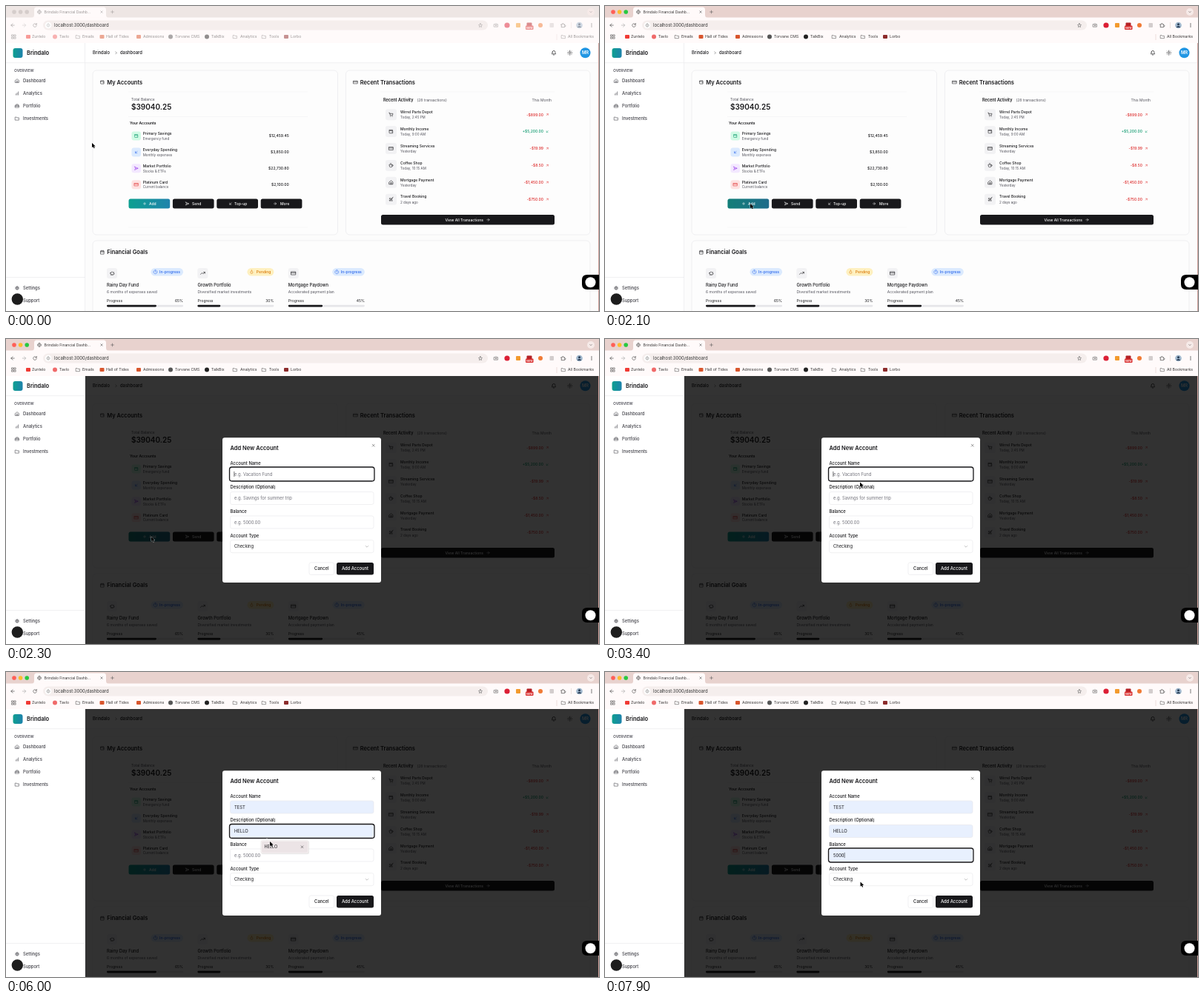
Recreate the animation shown at these times as an HTML page. Size 800 px wide and 412 px high, loop 8 s.

```html
<!DOCTYPE html>
<html lang="en">
<head>
<meta charset="utf-8">
<title>Finance dashboard</title>
<style>
  html, body { margin: 0; width: 100%; height: 100%; overflow: hidden; background: #fff; }
  svg { display: block; width: 800px; height: 412px; }
  text { font-family: Inter, "Liberation Sans", sans-serif; white-space: pre; }
  .idle .dim { opacity: .5; }
  .idle .strip { fill: #eee6e4; }
  .idle .light { fill: #d5cdcb; }
</style>
</head>
<body>
<svg id="stage" viewBox="0 0 800 412"></svg>
<script>
const INK = '#18181b', MUTED = '#52525b', LINE = '#e6e6e9', SOFT = '#f2f2f4';
const XS = 5, SM = 5.83, LG = 7.5, TINY = 4.58;

const ICONS = {
  home: 'M3 10l9-7 9 7v11H3zM9 21v-8h6v8',
  bars: 'M6 20v-5M12 20V10M18 20V4',
  case: 'M3 9h18v11H3zM7 9V4h10v5M3 14h18',
  folder: 'M3 5h6l2 3h10v12H3z',
  gear: 'M12 5a7 7 0 1 0 .01 0M12 9.5a2.5 2.5 0 1 0 .01 0M12 2v3M12 19v3M2 12h3M19 12h3M5 5l2 2M17 17l2 2M5 19l2-2M17 7l2-2',
  sun: 'M12 8a4 4 0 1 0 .01 0M12 2v2M12 20v2M2 12h2M20 12h2M5 5l1 1M18 18l1 1M5 19l1-1M18 6l1-1',
  bell: 'M6 9a6 6 0 0 1 12 0c0 6 3 8 3 8H3s3-2 3-8M10 21h4',
  wallet: 'M19 7V4H5a2 2 0 0 0 0 4h15v12H5a2 2 0 0 1-2-2V6M16 14h2',
  card: 'M2 5h20v14H2zM2 10h20',
  cart: 'M2 3h3l3 13h11l2-9H6M9 20v1M18 20v1',
  cup: 'M4 8h13v8a4 4 0 0 1-4 4H8a4 4 0 0 1-4-4zM17 9h2a3 3 0 0 1 0 6h-2M8 2v2M13 2v2',
  plane: 'M21 3l-6 6-10-3-2 2 8 5-4 4-3-1-1 1 4 4 1-1-1-3 4-4 5 8 2-2-3-10z',
  up: 'M7 17L17 7M8 7h9v9',
  down: 'M17 7L7 17M16 17H7V8',
  right: 'M5 12h14M12 5l7 7-7 7',
  left: 'M19 12H5M12 5l-7 7 7 7',
  plus: 'M12 5v14M5 12h14',
  cross: 'M6 6l12 12M18 6L6 18',
  send: 'M3 3l18 9-18 9 4-9zM7 12h14',
  trend: 'M2 17l7-7 5 5 8-8M16 7h6v6',
  pig: 'M5 11a7 6 0 0 1 12-3l3-1v4l2 1v4h-3l-2 4h-3v-2h-4v2H7l-1-4a6 6 0 0 1-1-5z',
  cal: 'M4 5h16v16H4zM4 10h16M8 2v5M16 2v5',
  clock: 'M12 2a10 10 0 1 0 .01 0M12 7v5l3 2',
  flame: 'M12 3c1 5 6 6 6 12a6 6 0 0 1-12 0c0-3 2-4 2-6 2 1 3 2 4-6',
  chevR: 'M9 5l7 7-7 7',
  chevD: 'M5 9l7 7 7-7',
  reload: 'M19 8a8 8 0 1 0 1 6M20 3v6h-6',
  star: 'M12 3l3 6 6 1-4.500 4.500 1 6.500-5.500-3-5.500 3 1-6.500L3 10l6-1z',
  camera: 'M3 7h5l2-3h4l2 3h5v13H3zM12 10a3 3 0 1 0 .01 0',
  puzzle: 'M4 8h5a3 3 0 1 1 5 0h5v5a3 3 0 1 1 0 4v4H4v-5a2 2 0 1 0 0-4z',
  grid: 'M3 3h7v7H3zM14 3h7v7h-7zM3 14h7v7H3zM14 14h7v7h-7z',
  globe: 'M12 2a10 10 0 1 0 .01 0M2 12h20M12 2c-6 6-6 14 0 20M12 2c6 6 6 14 0 20',
  info: 'M12 2a10 10 0 1 0 .01 0M12 11v6M12 7v1'
};

// Text is placed by the vertical middle of its capitals.
const text = (x, mid, str, size = XS, weight = 400, fill = INK, anchor = 'start') =>
  `<text x="${x}" y="${mid + size * .36}" font-size="${size}" font-weight="${weight}" fill="${fill}" text-anchor="${anchor}">${str}</text>`;
const rect = (x, y, w, h, fill, r = 0, extra = '') =>
  `<rect x="${x}" y="${y}" width="${w}" height="${h}" rx="${r}" fill="${fill}" ${extra}/>`;
const dot = (x, y, r, fill, extra = '') => `<circle cx="${x}" cy="${y}" r="${r}" fill="${fill}" ${extra}/>`;
const line = (x1, y1, x2, y2, color = LINE) =>
  `<path d="M${x1} ${y1}L${x2} ${y2}" stroke="${color}" stroke-width=".6"/>`;
const icon = (x, y, name, size = 6.4, color = INK) =>
  `<path d="${ICONS[name]}" transform="translate(${x - size / 2} ${y - size / 2}) scale(${size / 24})" fill="none" stroke="${color}" stroke-width="2.1" stroke-linecap="round" stroke-linejoin="round"/>`;
const border = (color = LINE) => `stroke="${color}" stroke-width=".6"`;
const group = (id, body, extra = '') => `<g id="${id}" ${extra}>${body}</g>`;

function browser() {
  const marks = [
    [30, 35, 'Zuntelo', '#f03a34', 's'], [66, 72, 'Tavlo', '#f06a6a', 'o'], [97, 103, 'Emails'],
    [129.5, 135, 'Hall of Tides', '#d8552c', 's'], [179, 185, 'Admissions', '#d8552c', 's'],
    [222, 228, 'Torvane CMS', '#555', 'o'], [271, 277, 'TalkBix', '#222', 'o'],
    [309, 316, 'Analytics'], [348, 355, 'Tools'], [378, 384, 'Lorbo', '#8c2b2b', 's']
  ];
  let s = rect(0, 0, 800, 16, '#e8d2ce', 0, 'class="strip"');
  ['#ff5f57', '#febc2e', '#28c840'].forEach((c, i) => s += dot(11 + i * 8.6, 8, 2.8, c, 'class="light"'));
  s += `<path d="M34 16q4 0 4-4V5q0-3.500 3.500-3.500h90q3.500 0 3.500 3.500v7q0 4 4 4z" fill="#fffafa"/>`
    + rect(0, 15.5, 800, 34.5, '#fffafa')
    + rect(50, 19.5, 600, 13, '#f5eeed', 6.5)
    + dot(57, 26, 4.3, '#fff') + dot(789, 8, 5, '#f6eae8');
  let d = icon(45, 8, 'globe', 6, '#555') + text(51.5, 8, 'Brindalo Financial Dashb…', XS, 400, '#333')
    + icon(129, 8, 'cross', 5) + icon(143.500, 8, 'plus', 6.5, '#555') + icon(789, 8, 'chevD', 4.5)
    + icon(9, 26, 'left', 7.5, '#444') + icon(24.5, 26, 'right', 7.5, '#aaa') + icon(39, 26, 'reload', 7, '#444')
    + icon(57, 26, 'info', 5, '#555') + icon(640, 26, 'star', 6.5, '#555')
    + icon(661, 26, 'camera', 6.5, '#555') + dot(676, 26, 3.6, '#dc1f35')
    + rect(688, 23, 6, 6, '#f39a2d', 1) + rect(702.5, 22.500, 7, 6, '#b32025', 1)
    + rect(701, 26.5, 10.5, 5.5, '#d92b2b', 1) + text(706.2, 29.3, 'New', 3.8, 600, '#fff', 'middle')
    + dot(721, 26, 3, '#f07a35') + rect(733.5, 23, 5.500, 6, '#d3cdcd', 1)
    + icon(751.5, 26, 'puzzle', 7, '#333') + line(762.5, 22, 762.5, 30, '#dfcfcc')
    + dot(773.5, 26, 4.3, '#9fb6cc') + dot(773.5, 24.8, 1.5, '#263a52') + `<path d="M770.500 29q3-4 6 0z" fill="#263a52"/>`
    + [-2, 0, 2].map(k => dot(790, 26 + k, .65, '#444')).join('');
  d += icon(10.5, 41.5, 'grid', 7, '#555');
  marks.forEach(([ix, tx, name, color, shape]) => {
    d += !color ? icon(ix, 41.5, 'folder', 6.5, '#555')
      : shape === 'o' ? dot(ix, 41.5, 3, color) : rect(ix - 3, 39, 6, 5, color, 1);
    d += text(tx, 41.5, name, 5.2, 400, '#333');
  });
  d += line(743, 38, 743, 46, '#dfcfcc') + icon(752, 41.5, 'folder', 6.5, '#555')
    + text(758, 41.5, 'All Bookmarks', 5.2, 400, '#333');
  return s + `<g class="dim">${d}</g>` + text(65, 26, 'localhost:3000/dashboard', 5.9, 400, '#333');
}

function sidebar() {
  const items = [[101, 'home', 'Dashboard'], [118, 'bars', 'Analytics'], [135, 'case', 'Portfolio'],
    [152, 'folder', 'Investments'], [381, 'gear', 'Settings'], [398, 'clock', 'Support']];
  return rect(0, 50, 106.5, 362, '#fff') + line(106.5, 50, 106.5, 412) + line(0, 76.700, 106.5, 76.7) + line(0, 366.5, 106.5, 366.5)
    + rect(9.5, 57, 13, 13, 'url(#teal)', 3) + text(28, 63.5, 'Brindalo', LG, 600)
    + text(11, 87, 'OVERVIEW', XS, 600, MUTED)
    + items.map(([y, i, name]) => icon(15, y, i, 6.4, '#3f3f46') + text(23, y, name, SM, 500, '#3f3f46')).join('');
}

function accounts() {
  const rows = [
    ['Primary Savings', 'Emergency fund', '$12,459.45', 'wallet', '#d1fae5', '#059669'],
    ['Everyday Spending', 'Monthly expenses', '$3,850.00', 'down', '#dbeafe', '#2563eb'],
    ['Market Portfolio', 'Stocks &amp; ETFs', '$22,730.80', 'send', '#f3e8ff', '#9333ea'],
    ['Platinum Card', 'Current balance', '$2,100.00', 'card', '#fee2e2', '#dc2626']
  ];
  const buttons = [['Add', 'plus', 187, 193], ['Send', 'send', 244.5, 251], ['Top-up', 'down', 303, 308], ['More', 'right', 363, 370]];
  let s = panel(117, 87, 330.5, 222, 'wallet', 'My Accounts', 103)
    + line(165, 116, 407, 116, SOFT) + line(165, 149.5, 407, 149.5, SOFT) + line(165, 299, 407, 299, SOFT)
    + text(169, 126.5, 'Total Balance', XS, 400, MUTED) + text(169, 136.5, '$39040.25', 10, 600)
    + text(167, 158.5, 'Your Accounts', XS, 600);
  rows.forEach(([name, sub, sum, ic, bg, fg], i) => {
    const y = 175.5 + i * 21.9;
    s += rect(169.5, y - 6, 12.5, 12, bg, 3) + icon(175.8, y, ic, 6, fg)
      + text(184.7, y - 3.4, name, XS, 500) + text(184.7, y + 3.6, sub, TINY, 400, MUTED)
      + text(381.7, y, sum, XS, 500, INK, 'end');
  });
  buttons.forEach(([name, ic, ix, tx], i) => {
    s += rect(165.5 + i * 59.4, 260.5, 55.7, 13, i ? INK : 'url(#teal)', 2.5);
    if (!i) s += rect(165.5, 260.5, 55.7, 13, '#1f3f4c', 2.5, 'id="hover" opacity=".35"');
    s += icon(ix, 267, ic, 5.5, '#fff') + text(tx, 267, name, XS, 500, '#fff');
  });
  return s;
}

function activity() {
  const rows = [
    ['Wirrel Parts Depot', 'Today, 2:45 PM', '-$899.00', 'cart'],
    ['Monthly Income', 'Today, 9:00 AM', '+$5,200.00', 'wallet'],
    ['Streaming Services', 'Yesterday', '-$19.99', 'card'],
    ['Coffee Shop', 'Today, 10:15 AM', '-$8.50', 'cup'],
    ['Mortgage Payment', 'Yesterday', '-$1,450.00', 'home'],
    ['Travel Booking', '2 days ago', '-$750.00', 'plane']
  ];
  let s = panel(458.5, 87, 329.5, 222, 'card', 'Recent Transactions', 103)
    + line(505, 116, 740, 116, SOFT) + line(505, 299, 740, 299, SOFT)
    + text(509, 127.3, 'Recent Activity', 5.5, 600) + text(554.5, 127.3, '(28 transactions)', XS, 400, MUTED)
    + text(736, 127.3, 'This Month', XS, 400, MUTED, 'end');
  rows.forEach(([name, sub, sum, ic], i) => {
    const y = 146.7 + i * 22.9, gain = sum[0] === '+', color = gain ? '#059669' : '#dc2626';
    s += rect(512, y - 7.5, 15, 15, SOFT, 3) + icon(519.5, y, ic, 6.6)
      + text(532, y - 3.6, name, XS, 500) + text(532, y + 4, sub, TINY, 400, MUTED)
      + text(725, y, sum, XS, 500, color, 'end') + icon(730.3, y, gain ? 'down' : 'up', 5, color);
  });
  return s + rect(506, 282, 234, 13.5, INK, 2.5) + text(592.5, 288.8, 'View All Transactions', XS, 500, '#fff')
    + icon(650.5, 288.8, 'right', 5.5, '#fff');
}

function goals() {
  const list = [
    ['Rainy Day Fund', '6 months of expenses saved', 65, 'pig', 'In-progress'],
    ['Growth Portfolio', 'Diversified market investments', 30, 'trend', 'Pending'],
    ['Mortgage Paydown', 'Accelerated payment plan', 45, 'card', 'In-progress']
  ];
  let s = panel(117, 317, 671, 110, 'cal', 'Financial Goals', 332.7);
  list.forEach(([name, sub, pct, ic, state], i) => {
    const x = 136 + i * 122.4, end = x + 103, wait = state === 'Pending', w = wait ? 36 : 43.5;
    const fg = wait ? '#d97706' : '#2563eb';
    s += rect(x, 354, 14, 14, SOFT, 3) + icon(x + 7, 361, ic, 7)
      + rect(end - w, 354, w, 10.5, wait ? '#fef0c0' : '#dbeafe', 5.25)
      + icon(end - w + 6, 359.2, wait ? 'flame' : 'clock', 6, fg)
      + text(end - 4, 359.2, state, XS, 500, fg, 'end')
      + text(x, 377, name, SM, 500) + text(x, 386.2, sub, XS, 400, MUTED)
      + text(x, 398, 'Progress', XS) + text(end, 398, pct + '%', XS, 400, INK, 'end')
      + rect(x, 403.8, 103, 2.6, LINE, 1.3) + rect(x, 403.8, 1.03 * pct, 2.6, INK, 1.3);
  });
  return s;
}

function panel(x, y, w, h, ic, title, mid) {
  return rect(x, y, w, h, '#fdfdfd', 5, border()) + icon(x + 13, mid, ic, 6.4) + text(x + 19.3, mid, title, LG, 600);
}

function page() {
  return rect(107, 50, 693, 362, '#fcfcfc') + rect(107, 50, 693, 26.7, '#fff') + line(107, 76.7, 800, 76.7)
    + text(117, 63.3, 'Brindalo', SM, 500) + icon(148.5, 63.3, 'chevR', 5) + text(154, 63.3, 'dashboard', SM, 500)
    + icon(739, 63.2, 'bell', 7.5) + icon(760.7, 63.2, 'sun', 7.5)
    + dot(781.5, 63.2, 7, '#2196e3') + text(781.5, 63.2, 'MR', SM, 600, '#fff', 'middle')
    + accounts() + activity() + goals();
}

const FIELDS = [
  { label: 'Account Name', hint: 'e.g. Vacation Fund', value: 'TEST', focus: 2200, open: 3900, hover: 4900, pick: 5300 },
  { label: 'Description (Optional)', hint: 'e.g. Savings for summer trip', value: 'HELLO', focus: 5500, open: 5600, hover: 5800, pick: 6200 },
  { label: 'Balance', hint: 'e.g. 5000.00', value: '5000', focus: 6600, open: 6700, hover: 7000, pick: 7500 }
];
const fieldMid = i => 182.5 + i * 32.5;

function modal() {
  let s = rect(292, 133.3, 214, 195.7, '#fff', 3) + text(302.5, 147.5, 'Add New Account', LG, 600)
    + icon(495.7, 143.7, 'cross', 6, '#444');
  FIELDS.forEach((f, i) => {
    const y = fieldMid(i);
    s += text(302.5, y - 15, f.label, SM, 500)
      + rect(302.5, y - 8.5, 193.5, 17, '#fff', 2.5, `id="box${i}" ${border()}`)
      + rect(301.5, y - 9.5, 195.5, 19, 'none', 3.2, `id="ring${i}" stroke="${INK}" stroke-width="1.3"`)
      + group('hint' + i, text(308, y, f.hint, SM, 400, '#71717a'))
      + group('value' + i, text(308, y, f.value, SM, 400, INK))
      + rect(307.6, y - 3.6, .6, 7.2, INK, 0, `id="caret${i}"`);
  });
  s += text(302.5, 265.5, 'Account Type', SM, 500) + rect(302.5, 271.700, 193.5, 17, '#fff', 2.5, border())
    + text(308, 280.2, 'Checking', SM) + icon(487, 280.2, 'chevD', 6, '#888')
    + rect(409, 302, 33.5, 16.5, '#fff', 2.5, border()) + text(425.8, 310.3, 'Cancel', SM, 500, INK, 'middle')
    + rect(446, 302, 50, 16.5, INK, 2.5) + text(471, 310.3, 'Add Account', SM, 500, '#fff', 'middle');
  FIELDS.forEach((f, i) => {
    const y = fieldMid(i) + 21.3;
    s += group('pop' + i, rect(344.5, y - 8, 64.5, 18, '#000', 2, 'opacity=".07"')
      + `<path d="M348.500 ${y - 8.200}l3.500-3.500 3.500 3.500z" fill="#fff"/>`
      + rect(344, y - 8.5, 64, 17, '#fbf8f8', 2, border('#e4dede'))
      + rect(345, y - 7.5, 62, 15, '#ece4e6', 1.5, `id="row${i}"`)
      + text(348.5, y, f.value, 5.5) + icon(399.500, y, 'cross', 5.5));
  });
  return s;
}

document.getElementById('stage').innerHTML =
  `<defs><linearGradient id="teal"><stop stop-color="#0d9f90"/><stop offset="1" stop-color="#1f83ac"/></linearGradient></defs>`
  + page() + rect(107, 50, 693, 362, '#000', 0, 'id="shade"') + sidebar() + group('modal', modal())
  + rect(799, 0, 1, 412, '#cfa09a')
  + dot(15.3, 396, 8.3, '#fff', 'opacity=".6"') + dot(15.3, 396, 7.7, '#1d1d1d')
  + `<path d="M800 363h-16q-7 0-7 7v6q0 7 7 7h16z" fill="#000"/>` + dot(788.5, 373.2, 7, '#fff')
  + group('browser', browser())
  + group('cursor', `<path d="M0 0v6.200l1.500-1.300 1.100 2.400 1.100-.5-1-2.300h2z" fill="#000" stroke="#fff" stroke-width=".6" paint-order="stroke"/>`);

const $ = id => document.getElementById(id);
const show = (id, on) => $(id).setAttribute('display', on ? 'inline' : 'none');
const LOOP = 8000, STEP = 100, ACTIVE = 500, OPEN = 2200;

// Pointer stops: time, x, y
const PATH = [[0, 116, 185], [500, 116, 185], [1700, 196, 267], [2300, 196, 267], [3000, 344, 193.5], [3500, 344, 193.5],
  [3800, 348, 185], [4500, 348, 185], [4900, 360, 203], [5200, 360, 203], [5500, 357, 215], [5800, 356, 229],
  [6100, 356, 229], [6500, 352, 248], [6700, 352, 248], [7000, 355, 267], [7400, 355, 267], [7800, 344.5, 283.5], [LOOP, 344.5, 283.5]];

function pointer(t) {
  const i = PATH.findIndex(p => p[0] > t), [t0, x0, y0] = PATH[i - 1], [t1, x1, y1] = PATH[i];
  const k = (t - t0) / (t1 - t0), e = k * k * (3 - 2 * k);
  return [x0 + (x1 - x0) * e, y0 + (y1 - y0) * e];
}

function draw(t) {
  const opening = t < OPEN + STEP, [x, y] = pointer(t);
  $('browser').setAttribute('class', t < ACTIVE ? 'idle' : '');
  $('cursor').setAttribute('transform', `translate(${x} ${y})`);
  show('hover', t >= 1600 && t < 2400);
  show('shade', t >= OPEN);
  show('modal', t >= OPEN);
  $('shade').setAttribute('opacity', opening ? .6 : .8);
  $('modal').setAttribute('opacity', opening ? .82 : 1);
  $('modal').setAttribute('transform', opening ? 'translate(399 231.500) scale(.99) translate(-399 -231)' : '');
  FIELDS.forEach((f, i) => {
    const next = FIELDS[i + 1], focused = t >= f.focus && (!next || t < next.focus);
    const filled = t >= f.hover, picked = t >= f.pick;
    const blink = (t - (picked ? f.pick : f.focus)) % 1000 < 500;
    show('ring' + i, focused);
    show('hint' + i, !filled);
    show('value' + i, filled);
    show('pop' + i, t >= f.open && !picked);
    show('row' + i, filled);
    show('caret' + i, focused && blink && (!filled || picked));
    $('box' + i).setAttribute('fill', filled ? '#e8f0fe' : '#fff');
    $('caret' + i).setAttribute('x', picked ? 308.3 + $('value' + i).firstChild.getComputedTextLength() : 307.6);
  });
}

function tick() {
  draw(Math.floor(performance.now() % LOOP / STEP) * STEP);
  requestAnimationFrame(tick);
}
tick();
</script>
</body>
</html>
```
